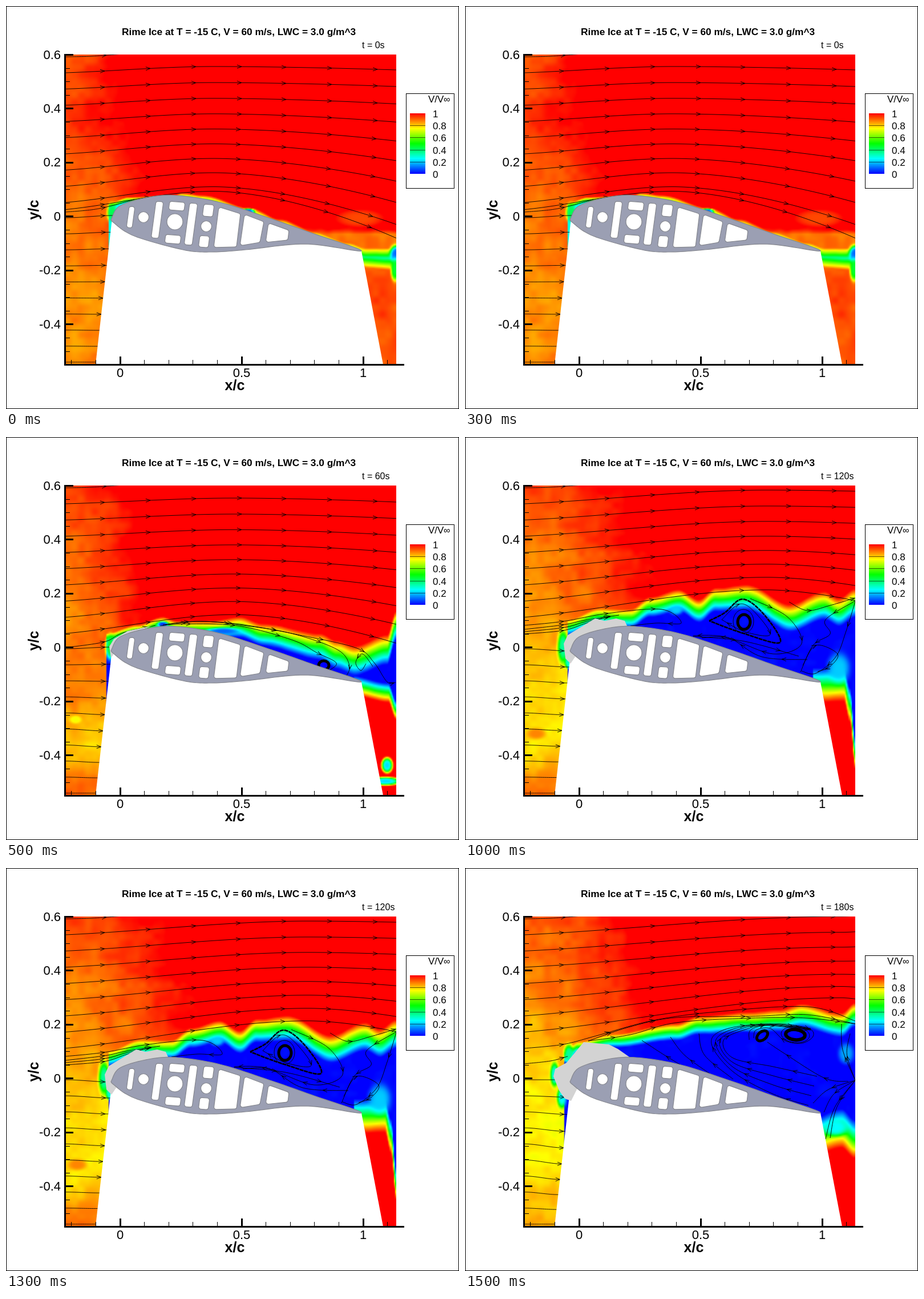
An HTML page with a canvas that plays this animation: 794 by 706 pixels, repeating every 2 s.

```html
<!DOCTYPE html>
<html lang="en">
<head>
<meta charset="utf-8">
<title>Rime ice flow field</title>
<style>
html, body { margin: 0; width: 100%; height: 100%; overflow: hidden; background: #fff; }
canvas { display: block; }
</style>
</head>
<body>
<canvas id="stage" width="794" height="706"></canvas>
<script>
const W = 794, H = 706, STEP_MS = 500;
const PLOT = { x: 104, y: 85, w: 580, h: 543 };
const FONT = '"Liberation Sans", Arial, sans-serif';
const range = (n, make) => Array.from({ length: n }, (_, i) => make(i));

// inflow: speed down the left side. top, bottom: wake edges as x, y.
// depth: wake thickness at both ends. spots: x, y, rx, ry, speed.
// lift, drop: rise and final offset of the first and last free streamline.
const clean = {
  time: 0, floor: .25, aft: .92, gain: .08, tilt: [-4, 1],
  inflow: [.93, .95, .9, .88, .88, .86, .87],
  top: [180, 344, 215, 334, 295, 331, 308, 327, 345, 331, 430, 354, 480, 373, 540, 393, 600, 411, 632, 420, 684, 420],
  depth: [13, 33], bottom: [610, 425, 684, 430], under: 36,
  spots: [[186, 362, 7, 13, .42], [425, 360, 9, 4, .08], [684, 434, 9, 12, .1], [682, 462, 6, 16, .45], [620, 372, 38, 14, .93]],
  lines: 10, crest: 365, lift: [11, 32], drop: [-5, 50],
  curves: [[104, 361, 150, 357, 185, 350, 225, 339]], rings: [], ice: []
};

const light = {
  time: 60, floor: 0, aft: 1.1, gain: .08, tilt: [-3, 4],
  inflow: [.93, .9, .88, .87, .86, .79, .9],
  top: [176, 342, 230, 328, 275, 315, 300, 322, 365, 321, 410, 315, 450, 327, 550, 344, 580, 357, 612, 366, 668, 347, 684, 304],
  depth: [20, 52], bottom: [610, 419, 670, 431, 684, 462], under: 34,
  spots: [[183, 368, 7, 18, .45], [275, 328, 8, 4, .05], [380, 340, 25, 5, .1], [668, 575, 8, 11, .22],
    [665, 603, 22, 6, .22], [122, 495, 9, 6, .74]],
  lines: 9, crest: 400, lift: [10, 33], drop: [-3, 17],
  curves: [
    [104, 369, 172, 359, 205, 343, 262, 330],
    [270, 331, 340, 323, 415, 330, 500, 344, 580, 372, 602, 400, 596, 420],
    [275, 329, 330, 323, 410, 328, 520, 348, 615, 370, 645, 395, 668, 429, 683, 430],
    [280, 328, 400, 330, 500, 355, 545, 378, 579, 396, 563, 411],
    [643, 402, 625, 380, 613, 395, 622, 409, 631, 397]],
  rings: [[557, 400, 9, 8, 0, 5]],
  ice: [184, 387, 181, 367, 189, 354, 213, 340, 255, 331, 210, 350]
};

const grown = {
  time: 120, floor: 0, aft: 1.1, gain: .04, tilt: [4, 2],
  inflow: [.92, .89, .86, .84, .77, .78, .89],
  top: [180, 317, 235, 298, 290, 300, 325, 280, 375, 267, 410, 285, 440, 264, 495, 259, 570, 293, 630, 270, 655, 282, 684, 266],
  depth: [30, 50], bottom: [610, 404, 664, 403, 675, 440, 684, 525], under: 60,
  spots: [[172, 368, 8, 24, .35], [181, 395, 5, 9, .3], [370, 303, 10, 7, .2], [125, 520, 14, 8, .87], [655, 405, 16, 22, .2]],
  lines: 8, crest: 530, lift: [24, 48], drop: [-22, -29],
  curves: [
    [104, 330, 172, 323, 250, 309, 345, 302, 379, 326, 335, 326, 290, 331],
    ...range(3, i => [104, 337 + 4 * i, 172, 329 + 5 * i, 210, 321 + 3 * i, 270 - 15 * i, 312 + 3 * i]),
    [450, 320, 480, 293, 505, 304, 535, 346, 490, 341, 450, 320],
    [500, 283, 565, 315, 590, 362, 540, 380, 460, 352, 415, 352],
    [600, 390, 520, 385, 460, 351, 400, 349, 490, 358, 585, 384],
    [684, 287, 632, 320, 640, 345, 610, 365, 588, 412],
    [684, 288, 668, 340, 650, 385, 615, 414, 590, 410],
    [592, 400, 615, 365, 653, 380, 640, 402, 618, 411],
    [568, 289, 600, 304, 640, 295, 684, 282]],
  heavy: [428, 322, 455, 308, 487, 284, 525, 312, 552, 360, 485, 343, 428, 322],
  rings: [[489, 324, 11, 13, 0, 5], [488, 323, 18, 21, 0, .9]],
  ice: [185, 397, 176, 388, 173, 362, 180, 347, 228, 318, 245, 322, 265, 318, 280, 322, 285, 333, 210, 360]
};

const heavy = {
  time: 180, floor: 0, aft: 1.1, gain: .045, tilt: [0, 7],
  inflow: [.9, .88, .84, .79, .74, .78, .84],
  top: [175, 318, 198, 302, 260, 289, 370, 272, 410, 259, 500, 252, 550, 248, 590, 238, 660, 254, 684, 236],
  depth: [23, 42], bottom: [610, 437, 660, 422, 684, 442], under: 68,
  spots: [[157, 362, 6, 17, .28], [170, 402, 7, 15, .25], [182, 326, 7, 14, .35], [668, 325, 11, 15, .16], [650, 455, 18, 12, .25]],
  lines: 7, crest: 660, lift: [32, 60], drop: [-33, -58],
  curves: [
    [104, 316, 172, 309, 230, 294, 330, 267, 440, 252, 600, 243, 684, 268],
    [104, 343, 150, 338, 180, 330],
    ...range(2, i => [216, 303, 290, 278 + 14 * i, 370, 262 + 9 * i, 500, 260 + 3 * i, 600, 257 + 6 * i, 684, 273]),
    [498, 301, 503, 282, 550, 273, 602, 281, 610, 295, 590, 307, 560, 302, 535, 281, 510, 284, 506, 298],
    ...range(4, i => [602 + 5 * i, 416 - 17 * i, 540, 396 - 16 * i, 470, 357 - 8 * i, 432 + 7 * i, 308 - 2 * i,
      455 + 12 * i, 283, 530, 273 + i, 606, 281 + i]),
    ...range(3, i => [390 + 40 * i, 352 + 9 * i, 350 + 35 * i, 328, 310 + 50 * i, 302 - 6 * i]),
    ...[[610, 412], [629, 428], [632, 475], [640, 473], [660, 273], [675, 290]].map(([x, y]) =>
      [684, 372, x / 2 + 332, y / 2 + 182, x, y]),
    [672, 374, 630, 368, 560, 325, 530, 305]],
  rings: [[521, 294, 11, 7, -.7, 5], [579, 292, 17, 9, .1, 6], [579, 292, 25, 14, .1, .9]],
  ice: [186, 408, 175, 404, 165, 390, 155, 365, 158, 352, 178, 341, 208, 305, 252, 309, 268, 317, 288, 331, 200, 380]
};

const AIRFOIL = [185, 372, 200, 350, 250, 335, 300, 332, 375, 344, 460, 371, 540, 399, 623, 429,
  525, 417, 420, 427, 360, 431, 310, 427, 225, 403, 188, 379, 185, 372];
const SLOTS = [[216, 351, 10, 37], [263, 342, 13, 64], [287, 342, 27, 15], [280, 400, 27, 15],
  [322, 345, 14, 73], [347, 347, 18, 21], [340, 402, 17, 20]];
const BAYS = [[373, 352, 411, 364, 404, 422, 364, 423], [418, 365, 452, 378, 445, 414, 410, 420],
  [460, 380, 496, 393, 494, 410, 455, 414]];
const ROUND_HOLES = [[241, 370, 9.5], [296, 378, 14], [351, 386, 9.5]];

const clamp = (v, lo = 0, hi = 1) => Math.min(hi, Math.max(lo, v));
const mix = (a, b, t) => a + (b - a) * t;
const ease = t => t * t * (3 - 2 * t);
const rainbow = v => [4 * v - 2, Math.min(4 * v, 4 - 4 * v), 2 - 4 * v].map(c => 255 * clamp(c));
const pairs = flat => flat.flatMap((v, i) => i % 2 ? [] : [[v, flat[i + 1]]]);

function hash(x, y, seed) {
  const s = Math.sin(x * 127.1 + y * 311.7 + seed * 74.7) * 43758.5453;
  return s - Math.floor(s);
}

function noise(x, y, seed) {
  const i = Math.floor(x), j = Math.floor(y), u = ease(x - i), v = ease(y - j);
  return 2 * mix(mix(hash(i, j, seed), hash(i + 1, j, seed), u),
    mix(hash(i, j + 1, seed), hash(i + 1, j + 1, seed), u), v) - 1;
}

function edgeAt(edge, x) {
  if (x < edge[0]) return Infinity;
  let i = 0;
  while (i < edge.length - 4 && x > edge[i + 2]) i += 2;
  return mix(edge[i + 1], edge[i + 3], ease(clamp((x - edge[i]) / (edge[i + 2] - edge[i]))));
}

function freeSpeed(s, x, y) {
  if (x > 600 && y > 425) return s.aft;
  const row = clamp((y - PLOT.y) / 90.5, 0, 5.99), i = Math.floor(row);
  const growth = s.gain * ((x - PLOT.x) / 100) ** 1.6 * clamp((400 - y) / 80);
  return Math.min(1.1, mix(s.inflow[i], s.inflow[i + 1], row - i) + growth);
}

function speed(s, x, y, top, bottom) {
  const grain = noise(x / 30, y / 30, s.time) + .6 * noise(x / 12, y / 12, s.time + 1);
  let v = freeSpeed(s, x, y) + .026 * grain;
  if (y > top) {
    const depth = mix(...s.depth, clamp((x - 200) / 420));
    const wake = Math.max(s.floor, 1 - (y - top) / depth, (y - bottom) / s.under);
    v = Math.min(v, wake + .016 * grain);
  }
  for (const [cx, cy, rx, ry, level] of s.spots) {
    const d = ((x - cx) / rx) ** 2 + ((y - cy) / ry) ** 2;
    if (d < 6) v = mix(Math.min(v, 1.05), level, Math.exp(-d * d / 2));
  }
  return clamp(v);
}

function drawField(c, s) {
  const w = PLOT.w / 2, h = Math.ceil(PLOT.h / 2);
  const small = new OffscreenCanvas(w, h), sc = small.getContext('2d');
  const img = sc.createImageData(w, h);
  for (let i = 0; i < w; i++) {
    const x = PLOT.x + 2 * i + 1, top = edgeAt(s.top, x), bottom = edgeAt(s.bottom, x);
    for (let j = 0; j < h; j++) {
      const rgb = rainbow(speed(s, x, PLOT.y + 2 * j + 1, top, bottom));
      img.data.set([...rgb, 255], 4 * (j * w + i));
    }
  }
  sc.putImageData(img, 0, 0);
  c.drawImage(small, PLOT.x, PLOT.y, 2 * w, 2 * h);
}

// Catmull-Rom spline through the points.
function smooth(flat) {
  const p = pairs(flat), at = i => p[clamp(i, 0, p.length - 1)];
  const pts = range((p.length - 1) * 12, q => {
    const i = Math.floor(q / 12), t = q / 12 - i;
    return [0, 1].map(k => {
      const [a, b, d, e] = range(4, n => at(i + n - 1)[k]);
      return b + .5 * t * (d - a + t * (2 * a - 5 * b + 4 * d - e + t * (3 * (b - d) + e - a)));
    });
  });
  return [...pts, at(p.length - 1)];
}

function trace(c, points) {
  c.beginPath();
  points.forEach(([x, y]) => c.lineTo(x, y));
}

function arrow(c, [x0, y0], [x, y]) {
  c.save();
  c.translate(x, y);
  c.rotate(Math.atan2(y - y0, x - x0));
  trace(c, [[-7, -3], [1, 0], [-7, 3]]);
  c.stroke();
  c.restore();
}

function streamline(c, pts, next = 68) {
  trace(c, pts);
  c.stroke();
  let run = 0;
  for (let i = 1; i < pts.length; i++) {
    const a = pts[i - 1], b = pts[i];
    run += Math.hypot(b[0] - a[0], b[1] - a[1]);
    if (run >= next) {
      arrow(c, a, b);
      next += 79.5;
    }
  }
}

function freeLine(s, i) {
  const u = (i / (s.lines - 1)) ** 2, y0 = 117 + 28.4 * i - 16 * Math.max(0, i - 8);
  const lift = mix(...s.lift, u), drop = mix(...s.drop, u);
  return range(PLOT.w / 2 + 1, n => {
    const x = PLOT.x + 2 * n;
    const t = clamp((x - PLOT.x) / (s.crest - PLOT.x));
    const rise = lift * (ease(t) + Math.sin(t * Math.PI / 2)) / 2;
    const fall = clamp((x - s.crest) / (684 - s.crest)) ** 1.7;
    return [x, y0 - rise + (lift + drop) * fall];
  });
}

function lowerLine(s, i) {
  const y = 371 + 28.1 * i, end = 187 - (y - 372) * .117, u = i / 9;
  const shift = s.tilt[0] * (1 - u) ** 2 + s.tilt[1] * Math.sin(Math.PI * u);
  return range(41, n => [mix(PLOT.x, end, n / 40), y + shift * ease(n / 40)]);
}

function drawLines(c, s) {
  c.strokeStyle = '#000';
  c.lineWidth = .9;
  streamline(c, smooth([104, 89, 150, 88, 205, 84]));
  range(s.lines, i => streamline(c, freeLine(s, i)));
  range(10, i => {
    const pts = lowerLine(s, i);
    streamline(c, pts, i < 7 ? Math.min(68, pts[40][0] - PLOT.x - 2) : W);
  });
  s.curves.forEach(p => streamline(c, smooth(p), p[0] === PLOT.x ? 68 : 40));
  if (s.heavy) {
    c.lineWidth = 2.6;
    c.setLineDash([7, 1]);
    trace(c, smooth(s.heavy));
    c.stroke();
    c.setLineDash([]);
  }
  for (const [x, y, rx, ry, angle, width] of s.rings) {
    c.lineWidth = width;
    c.beginPath();
    c.ellipse(x, y, rx, ry, angle, 0, 7);
    c.stroke();
  }
}

function roundedPolygon(c, p, r) {
  const last = p[p.length - 1];
  c.beginPath();
  c.moveTo((last[0] + p[0][0]) / 2, (last[1] + p[0][1]) / 2);
  p.forEach((a, i) => {
    const b = p[(i + 1) % p.length];
    c.arcTo(...a, (a[0] + b[0]) / 2, (a[1] + b[1]) / 2, r);
  });
  c.closePath();
}

function slot([x, y, w, h]) {
  const lean = h * .135, sag = w * .08;
  return [[x, y], [x + w, y + sag], [x + w - lean, y + h + sag], [x - lean, y + h]];
}

function drawWing(c, s) {
  c.fillStyle = '#fff';
  trace(c, [[186, 372], [157, 628], [661, 628], [623, 429], [540, 405], [300, 360]]);
  c.fill();
  c.fillStyle = '#d3d3d3';
  trace(c, pairs(s.ice));
  c.fill();
  c.fillStyle = '#9b9fb3';
  c.strokeStyle = '#85878f';
  c.lineWidth = 1.2;
  trace(c, smooth(AIRFOIL));
  c.fill();
  c.stroke();
  c.fillStyle = '#fff';
  for (const hole of [...SLOTS.map(slot), ...BAYS.map(pairs)]) {
    roundedPolygon(c, hole, 4);
    c.fill();
    c.stroke();
  }
  for (const [x, y, r] of ROUND_HOLES) {
    c.beginPath();
    c.arc(x, y, r, 0, 7);
    c.fill();
    c.stroke();
  }
}

function text(c, str, x, y, size, align = 'left', weight = '') {
  c.font = `${weight} ${size}px ${FONT}`;
  c.textAlign = align;
  c.fillText(str, x, y);
}

function drawAxes(c) {
  const bar = (x, y, w, h) => c.fillRect(x, y, w, h);
  c.fillStyle = '#000';
  bar(102, 84, 3, 546);
  bar(102, 627, 596, 3);
  for (let i = 0; i < 24; i++) {
    const y = 85 + 23.62 * i;
    if (i % 4) bar(105, Math.round(y), 7, 1);
    else {
      bar(105, Math.round(y) - 1, 13, 3);
      text(c, String(+(.6 - i * .05).toFixed(1)), 96, y + 7.5, 22, 'right');
    }
  }
  for (let i = -2; i <= 11; i++) {
    const x = Math.round(199.5 + 42.6 * i);
    if (i % 5) bar(x, 620, 1, 7);
    else {
      bar(x - 1, 614, 3, 13);
      text(c, String(i / 10), x, 650, 22, 'center');
    }
  }
  text(c, 'x/c', 401, 673, 25, 'center', 'bold');
  c.save();
  c.translate(57, 357);
  c.rotate(-Math.PI / 2);
  text(c, 'y/c', 0, 0, 25, 'center', 'bold');
  c.restore();
}

function drawLegend(c) {
  c.strokeStyle = '#000';
  c.lineWidth = 1;
  c.strokeRect(701.5, 153.5, 84, 166);
  const shade = c.createLinearGradient(0, 188, 0, 294);
  for (let i = 0; i <= 4; i++) shade.addColorStop(i / 4, `rgb(${rainbow(1 - i / 4)})`);
  c.fillStyle = shade;
  c.fillRect(708, 188, 27, 106);
  for (let i = 0; i <= 5; i++) {
    const y = 188 + 21.2 * i;
    c.fillStyle = 'rgba(0,0,0,.6)';
    if (i % 5) c.fillRect(708, Math.round(y), 27, 1);
    c.fillStyle = '#000';
    text(c, String((10 - 2 * i) / 10), 748, y + 7, 17);
  }
  text(c, 'V/V', 740, 169, 17);
  text(c, '∞', 767, 169, 16);
}

function render(s) {
  const canvas = new OffscreenCanvas(W, H), c = canvas.getContext('2d');
  c.fillStyle = '#fff';
  c.fillRect(0, 0, W, H);
  c.save();
  c.beginPath();
  c.rect(PLOT.x, PLOT.y, PLOT.w, PLOT.h);
  c.clip();
  drawField(c, s);
  drawLines(c, s);
  drawWing(c, s);
  c.restore();
  drawAxes(c);
  drawLegend(c);
  text(c, 'Rime Ice at T = -15 C, V = 60 m/s, LWC = 3.0 g/m^3', 203, 51, 17.3, 'left', 'bold');
  text(c, `t = ${s.time}s`, 624, 74, 16);
  c.strokeRect(.5, .5, W - 1, H - 1);
  return canvas;
}

const stage = document.getElementById('stage').getContext('2d');
const pictures = [clean, light, grown, heavy].map(render);

function play() {
  stage.drawImage(pictures[Math.floor(performance.now() / STEP_MS) % pictures.length], 0, 0);
  requestAnimationFrame(play);
}
play();
</script>
</body>
</html>
```
